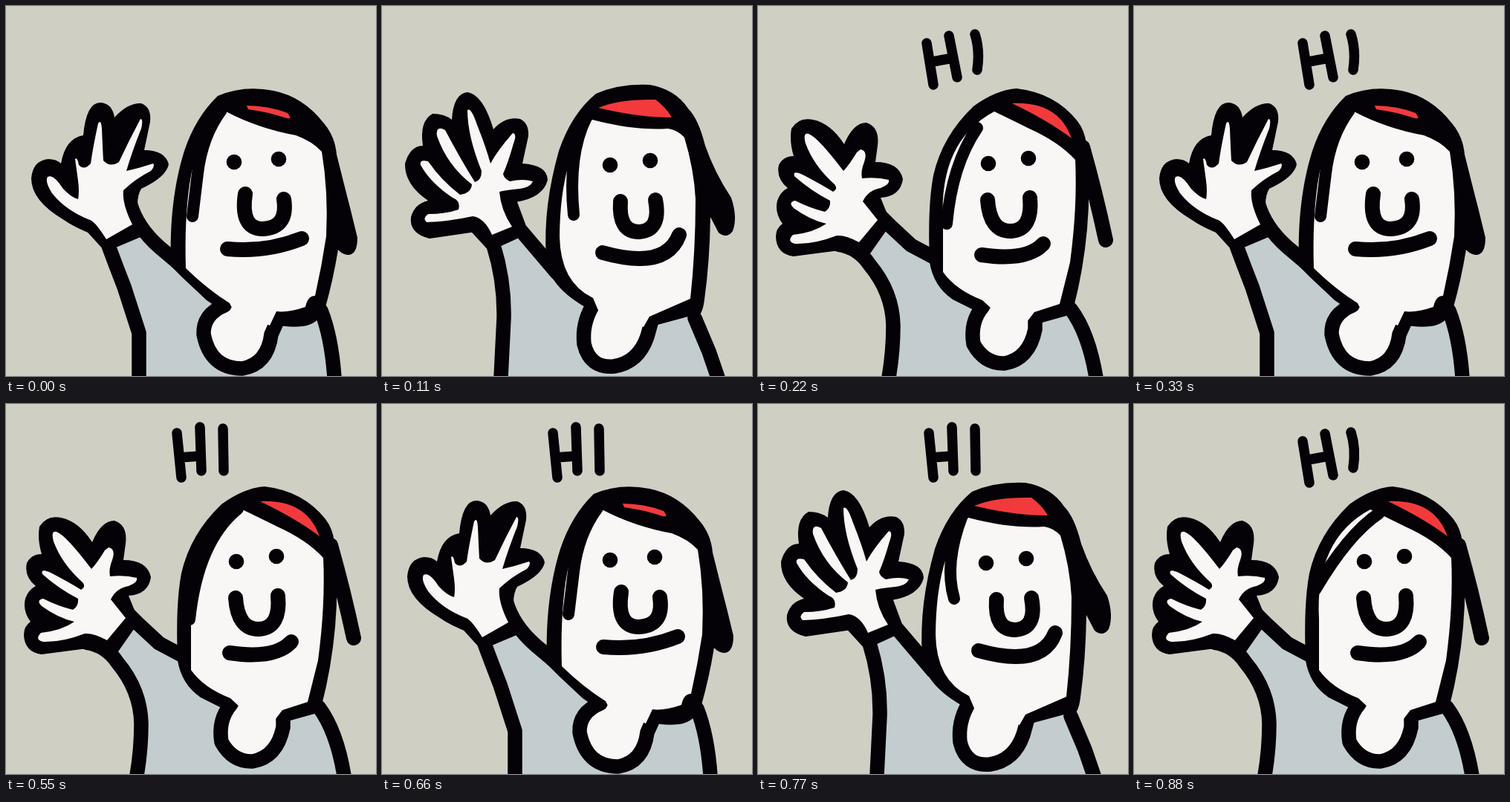
Animation of 498x498 px, one loop 0.99 s. Source, as an HTML page:

```html
<!DOCTYPE html>
<html lang="en">
<head>
<meta charset="utf-8">
<title>Hi</title>
<style>
  html, body { margin: 0; width: 100%; height: 100%; overflow: hidden; background: #cfcfc4; }
  svg { display: block; width: 100%; height: 100%; }
</style>
</head>
<body>
<svg id="stage" viewBox="0 0 498 498"></svg>
<script>
const INK = '#040206', SKIN = '#f8f7f5', SHIRT = '#c3cdcf', RED = '#f23a3d';
const STEP = 110;

const lean = {
  shirt: 'M140 325L180 303L237 355L300 402L425 410L441 500H179L178 440Z',
  arms: 'M117 298L137 320Q145 342 159 378L179 440V500M137 319L182 300M167 265Q176 298 207 325L238 351L296 401M424 410Q438 445 442 500',
  hand: 'M118 308Q92 298 78 288Q34 262 34 232Q36 208 57 206Q68 206 74 212Q80 178 104 174Q108 130 127 130Q143 131 146 150Q164 130 182 131Q196 136 194 156L186 194Q214 194 219 213Q216 230 182 246Q172 262 182 300L138 326Z',
  palm: 'M135 314Q120 290 113 288Q80 275 62 252Q52 236 56 230Q64 226 76 245Q88 258 97 260Q99 250 97 235L93 206Q96 203 98 214Q105 222 114 212Q117 190 124 158Q128 152 129 165Q130 190 131 208Q140 218 152 210Q166 180 181 152Q185 152 182 165Q170 195 162 222Q180 218 198 212Q201 215 195 222Q175 232 158 248Q156 266 170 294Z',
  head: 'M222 350C220 290 226 240 240 195Q255 150 285 121Q320 106 360 114Q400 122 428 158Q443 176 445 200Q455 240 464 275L473 312Q473 335 460 335Q452 334 447 328Q440 370 430 405Q422 428 400 431Q380 433 365 429L350 420L292 411L270 396L238 366Z',
  face: 'M296 142Q340 165 390 174Q412 182 425 196Q434 250 431 310Q425 350 416 390Q406 390 403 405Q380 413 364 411L355 430L305 408L301 400Q272 382 242 353Q240 290 247 240Q255 180 296 142Z',
  neck: 'M294 403Q265 415 266 442Q275 488 318 488Q352 482 357 442L366 422',
  red: 'M324 134Q352 134 379 144Q386 153 378 151Q350 142 326 139Z',
  eyes: [[307, 210], [367, 206]],
  nose: 'M322 253Q315 300 346 300Q380 298 374 260',
  mouth: 'M298 327Q350 332 398 313'
};

const left = {
  shirt: 'M140 335L168 295L206 321L236 345L300 400L420 410Q445 440 455 500H176Q195 420 150 348Z',
  arms: 'M108 321Q135 325 150 348Q181 385 182 430Q182 465 176 500M140 332L168 292M150 268L178 296L206 322L238 339M421 408Q445 440 455 500',
  hand: 'M118 328Q85 332 48 337Q25 334 24 311Q24 299 33 293Q22 278 26 262Q30 250 40 245Q24 232 28 214Q34 202 48 202Q42 182 45 165Q55 149 74 153Q98 158 116 186Q128 157 146 157Q164 163 161 188L158 210Q190 210 195 233Q192 256 165 258L178 290L142 334Z',
  palm: 'M136 318Q118 308 106 309Q75 321 50 320Q38 317 47 308Q75 305 92 293Q70 288 48 272Q40 264 50 262Q70 272 90 277Q98 272 97 262Q70 248 49 229Q46 220 62 228Q85 240 101 250Q108 246 103 240Q75 215 64 185Q60 170 68 172Q80 176 115 222Q122 215 133 197L138 193Q148 195 143 210Q138 222 140 232Q160 230 176 234Q178 240 165 245Q148 248 141 263L161 288Z',
  head: 'M231 345Q228 270 236 228Q248 175 290 135Q320 113 348 111Q400 117 430 155Q440 168 442 186Q448 245 443 300Q438 355 425 405L415 417L372 429L300 414L262 395Q236 377 231 345Z',
  lock: 'M437 190Q454 250 468 315',
  face: 'M318 142Q345 155 365 165Q405 183 427 207Q430 270 420 345L406 401L372 412L362 425L316 409L302 396Q266 382 249 358V290Q243 182 318 142Z',
  neck: 'M303 404Q285 425 290 455Q305 482 332 481Q365 475 373 435V420',
  red: 'M342 131C390 129 412 150 422 178Q390 154 342 131Z',
  eyes: [[310, 212], [364, 205]],
  nose: 'M309 261Q312 304 341 303Q370 301 366 258',
  mouth: 'M301 335Q362 344 384 320'
};

const upright = {
  shirt: 'M148 318L184 302L232 352L290 402L421 415L452 500H160L164 420Z',
  arms: 'M128 298L150 322Q165 370 164 420L160 500M148 318L183 302M172 265L185 300L236 360M421 420L440 465L452 500',
  hand: 'M126 304L64 313Q36 306 39 284Q44 266 62 262Q30 240 31 212Q38 188 55 188Q50 155 68 145Q84 145 94 153Q96 118 115 116Q136 119 150 166Q166 148 186 152Q198 158 197 175L189 212Q222 214 223 234Q217 258 180 264L189 300L150 324Z',
  palm: 'M148 308Q138 285 122 283Q90 290 60 291Q54 286 62 280Q85 280 103 274Q106 262 95 258Q65 238 52 214Q50 206 62 209Q80 235 105 254Q120 252 121 240Q88 215 74 175Q72 160 85 167Q105 205 125 237Q134 235 134 222Q115 175 115 140Q120 136 128 160Q140 190 146 212Q155 195 176 171Q182 172 177 185Q170 210 163 226Q164 232 172 236Q190 232 203 236Q200 244 185 246Q165 248 158 250Q160 275 175 297Z',
  head: 'M221 340C218 290 224 245 238 195Q255 145 288 118Q320 104 360 106Q395 112 412 138Q426 152 435 188Q448 225 470 258Q479 285 472 303Q464 314 453 305L442 284Q441 345 434 395Q430 428 412 418L360 432L290 414Q224 382 221 340Z',
  face: 'M283 153Q340 168 385 165Q398 167 407 177Q420 220 422 260Q422 330 415 394L360 418L352 432L292 412L284 393Q240 372 239 310Q240 200 283 153Z',
  neck: 'M283 404Q269 428 272 455Q280 488 312 485Q345 480 357 445L362 427',
  red: 'M291 137Q320 125 368 126Q382 136 390 150Q345 150 291 137Z',
  eyes: [[307, 214], [361, 208]],
  nose: 'M321 263Q318 304 346 304Q376 302 368 261',
  mouth: 'M297 332Q382 356 400 308'
};

const HI_TILTED = 'M227 50L236 106M235 75L262 70M257 40L268 96M292 38Q299 60 295 86';
const HI_STRAIGHT = 'M230 39L236 99M234 72L262 70M261 31L263 90M292 33L293 90';
const LEAN_STRAND = 'M290 140Q264 175 258 225L251 283';

// Each step: pose, greeting and the loose strand of hair on the left.
const steps = [
  [lean, '', LEAN_STRAND],
  [upright, '', 'M275 150Q250 200 258 281'],
  [left, HI_TILTED, 'M295 164Q261 214 254 293'],
  [lean, HI_TILTED, LEAN_STRAND],
  [upright, HI_TILTED, 'M275 150Q250 200 258 281'],
  [left, HI_STRAIGHT, 'M312 141Q258 185 247 290'],
  [lean, HI_STRAIGHT, LEAN_STRAND],
  [upright, HI_STRAIGHT, 'M275 150Q250 215 264 262'],
  [left, HI_TILTED, 'M330 147Q288 175 244 250']
];

const fill = (d, color) => `<path d="${d}" fill="${color}"/>`;
const line = (d, width, inside = 'none') =>
  `<path d="${d}" fill="${inside}" stroke="${INK}" stroke-width="${width}" stroke-linecap="round" stroke-linejoin="round"/>`;
const dot = ([x, y]) => `<circle cx="${x}" cy="${y}" r="10.3" fill="${INK}"/>`;

function draw([pose, greeting, strand]) {
  return [
    fill(pose.shirt, SHIRT),
    line(pose.arms, 19.5),
    fill(pose.hand, INK),
    fill(pose.palm, SKIN),
    pose.lock ? line(pose.lock, 20) : '',
    fill(pose.head, INK),
    line(pose.neck, 19.5, SKIN),
    fill(pose.face, SKIN),
    line(strand, 16),
    fill(pose.red, RED),
    ...pose.eyes.map(dot),
    line(pose.nose, 20),
    line(pose.mouth, 20),
    line(greeting, 13.5)
  ].join('');
}

const stage = document.getElementById('stage');
const start = performance.now();
let shown = -1;

function tick() {
  const index = Math.floor((performance.now() - start) / STEP) % steps.length;
  if (index !== shown) {
    stage.innerHTML = draw(steps[index]);
    shown = index;
  }
  requestAnimationFrame(tick);
}
tick();
</script>
</body>
</html>
```
